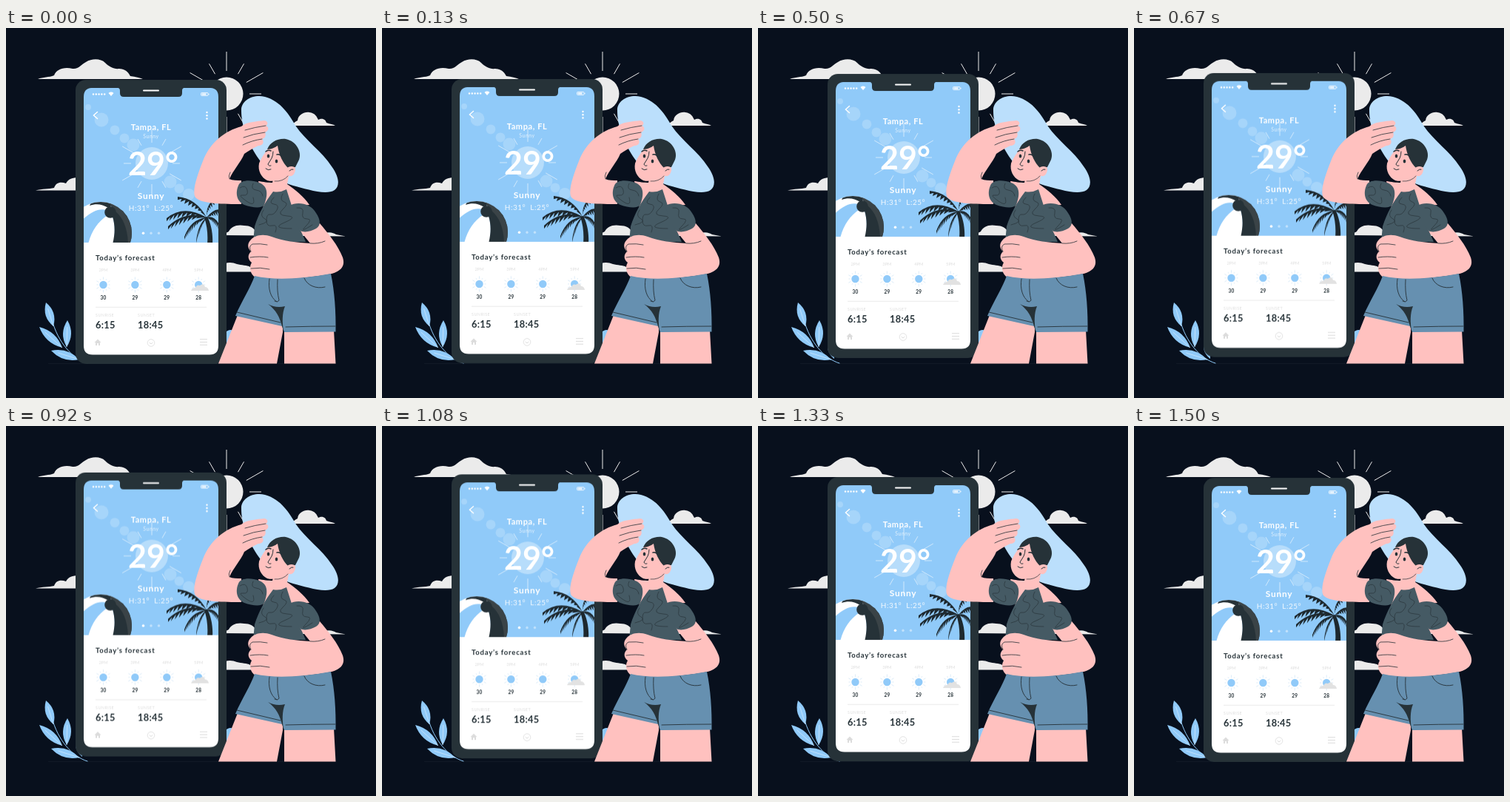
An HTML page that plays this animation: 500 by 500 pixels, repeating every 1540 ms.

```html
<!DOCTYPE html>
<html lang="en">
<head>
<meta charset="utf-8">
<title>Weather app</title>
<style>
  html, body { margin: 0; height: 100%; overflow: hidden; background: #08101d; }
  svg { display: block; width: 100vw; height: 100vh; }
  text { font-family: Lato, "Open Sans", sans-serif; }
  .ln { fill: none; stroke: #263238; stroke-linecap: round; stroke-linejoin: round; }
  .bold { font-weight: 700; }
  .mid { text-anchor: middle; }
  .ink { fill: #263238; }
  .skin { fill: #ffc1bf; }
  .top { fill: #455a64; }
  .blue { fill: #90caf9; }
</style>
</head>
<body>
<svg viewBox="0 0 500 500" xmlns="http://www.w3.org/2000/svg">
  <defs>
    <clipPath id="screen"><path d="M117 81H151Q154 81 154 85V88Q154 93 159 93H233Q238 93 238 88V85Q238 81 241 81H275Q287 81 287 93V429.500Q287 441.500 275 441.500H117Q105 441.500 105 429.500V93Q105 81 117 81Z"/></clipPath>
    <clipPath id="ball"><circle cx="128" cy="277" r="42"/></clipPath>
    <clipPath id="sky"><rect x="105" y="81" width="182" height="209"/></clipPath>
  </defs>

  <path d="M57 453.500H446" stroke="#141e29" stroke-width=".8"/>

  <g id="sun" stroke="#ebebeb" fill="#ebebeb"><circle cx="298" cy="89" r="22.500" stroke="none"/></g>

  <g fill="#ebebeb">
    <path d="M43 69C50 66 58 67 65 64C68 56 78 52 90 55C98 56 102 49 108 46C116 41 128 41 134 47C139 52 146 56 153 55C164 56 166 62 168 65C175 66 181 67 185 69Z"/>
    <path d="M40 219.500C49 217 58 218 65 216C67 209 74 207 81 210C84 204 90 202 98 202V219.500Z"/>
    <path d="M385 132C388 129 390 127 394 125C395 117 403 113 410 114C418 115 420 120 422 124C428 121 432 124 433 128C438 130 442 130 445 132Z"/>
    <path d="M290 280C295 278 298 277 301 275C304 268 313 265 322 267C330 267 334 270 337 274L430 277C438 275 443 277 446 279L459 281.500Z"/>
    <path d="M290 329.500V322C296 316 305 316 312 319C318 321 326 320 330 323L341 329.500Z"/>
  </g>

  <g id="plant">
    <path d="M110 453C90 447 70 425 62 394M82 428Q84 417 83 407M72 427Q60 418 52 409M99 448Q78 445 66 437" class="ln" style="stroke:#90caf9"/>
  </g>
  <path class="blue" d="M96 424C92 430 94 440 103 447V424ZM296 412C300 407 307 407 308 411C309 417 303 424 295 428Z"/>

  <g id="phone">
    <rect x="94" y="70" width="204" height="384" rx="14" fill="#263238"/>
    <path d="M186 84.500H206" stroke="#fff" stroke-width="2" stroke-linecap="round"/>
    <g clip-path="url(#screen)">
      <rect class="blue" x="105" y="81" width="182" height="210"/>
      <g id="flare" fill="#fff" fill-opacity=".2"></g>
      <g id="glow" stroke="#fff" stroke-opacity=".75"><circle cx="197" cy="183" r="22" fill="#fff" fill-opacity=".35" stroke="none"/></g>
      <g clip-path="url(#sky)">
        <g clip-path="url(#ball)">
          <path d="M136 246C124 243 114 249 100 262V230H150L141 244Z" fill="#fff"/>
          <path class="ink" d="M138 243C130 238 122 237 113 240L118 230L142 232C143 236 142 240 141 243Z"/>
          <path d="M137 253C124 262 115 275 111 292H145C148 277 147 264 144 255Z" fill="#fff"/>
          <path class="ink" d="M144 255C148 268 147 280 144 292H176V245L147 247Z"/>
          <path d="M148 248C158 256 164 270 165 290H175V240L141 230V240Z" fill="#3a4347"/>
        </g>
        <circle class="ink" cx="141" cy="249" r="7.800"/>
        <path d="M268 256C272 268 273 280 272 292H279C280 278 277 264 272 255Z" fill="#1d282e"/>
        <g id="palm" fill="#1d282e"></g>
      </g>

      <g fill="#fff">
        <g id="dots"></g>
        <path d="M138.500 88A5 5 0 0 1 145.500 88L142 92Z"/>
        <rect x="263.500" y="87.500" width="9.500" height="4" rx="1" fill="none" stroke="#fff" stroke-width=".8"/>
        <path d="M264.500 88.500H270.500V90.500H264.500ZM273.500 88.700H274.500V90.300H273.500Z"/>
        <path d="M123.500 113.500L118.500 118L123.500 122.500" fill="none" stroke="#fff" stroke-width="1.500" stroke-linecap="round"/>
        <g class="mid">
          <text class="bold" x="196" y="138.500" font-size="11" letter-spacing=".6">Tampa, FL</text>
          <text x="196" y="148.800" font-size="7" letter-spacing=".5" fill-opacity=".75">Sunny</text>
          <text class="bold" x="196" y="230.700" font-size="12" letter-spacing=".7">Sunny</text>
          <text x="196" y="247.500" font-size="10" letter-spacing=".5" fill-opacity=".9" xml:space="preserve">H:31°  L:25°</text>
        </g>
        <text class="bold" x="165" y="199.500" font-size="43">29°</text>
        <circle cx="185.500" cy="277.300" r="1.800"/>
        <g fill-opacity=".45"><circle cx="196" cy="277.300" r="1.700"/><circle cx="206.500" cy="277.300" r="1.700"/></g>
      </g>

      <rect x="105" y="290" width="182" height="152" fill="#fff"/>
      <text class="bold ink" x="121" y="314.300" font-size="9.600" letter-spacing=".75">Today’s forecast</text>
      <g id="hours"></g>
      <path d="M121 377.300H271" stroke="#e6e6e6" stroke-width=".8"/>
      <g font-size="5.500" letter-spacing=".4" fill="#dedede">
        <text x="121" y="389.800">SUNRISE</text>
        <text x="178" y="389.800">SUNSET</text>
      </g>
      <g class="bold ink" font-size="12.800" letter-spacing=".3">
        <text x="121" y="406">6:15</text>
        <text x="178" y="406">18:45</text>
      </g>
      <path d="M119.500 425L124 420.500L128.500 425H127V429H125V426H123V429H121V425Z" fill="#dcdcdc"/>
      <g fill="none" stroke="#dcdcdc">
        <circle cx="196" cy="425.500" r="4.800" stroke-width=".8"/>
        <path d="M193.800 425L196 427L198.200 425M262 420.700H272M262 424.500H272M262 428.300H272"/>
      </g>
    </g>
  </g>

  <g id="woman">
    <path d="M318 112C317 98 334 89 350 93C372 99 383 118 392 133C404 151 428 168 440 187C451 202 451 214 444 219C432 227 405 217 388 213C350 202 318 150 318 112Z" fill="#bbdffc"/>
    <!-- legs -->
    <path class="skin" d="M313 388L287 453.500H366L374 411V398ZM376 408V453.500H445.500L443 408Z"/>
    <!-- neck and shoulders -->
    <path class="skin" d="M362 200L360 209C355 209 347 208 341 207L348 240L337 280H402L400 240L410 239C403 228 390 218 380 211L384 190Z"/>
    <!-- raised arm -->
    <path class="skin" d="M318 133C324 127 340 126 349 125C355 126 354 131 351 132C357 134 354 140 350 141C352 145 350 149 346 150C350 155 346 159 341 159C334 162 328 166 322 170C317 182 307 192 302 204C306 206 312 206 318 206V238C296 238 264 238 256 229C251 221 258 200 266 180C276 154 296 139 318 133Z"/>
    <path class="ln" stroke-width=".8" d="M351 132Q336 134 323 138M350 141Q334 143 321 148M346 150Q332 152 320 158M302 204Q300 200 303 195"/>
    <!-- head -->
    <path class="skin" d="M360 155C353 164 345 175 342 183C340 193 345 202 353 206C360 208 367 206 371 204L381 200C389 200 392 194 390 187L385 160Z"/>
    <path class="ink" d="M353 164C357 154 367 149 378 150C393 153 400 168 396 178L391 188L381 189C374 182 369 172 367 159C364 161 359 164 353 164Z"/>
    <path class="skin" d="M379 190C382 186 390 186 391 190C391 197 386 203 381 199Z"/>
    <path class="ln" stroke-width="1" d="M383 193Q386 190 388 191M361 167Q361 172 359 176L354 184Q355 187 358 186M351 190Q354 193 358 191"/>
    <path class="ln" stroke-width="1.500" d="M351 167Q354 164 358 166M366 171Q370 170 373 174"/>
    <g class="ink"><ellipse cx="354.500" cy="173" rx="1.800" ry="2.500"/><ellipse cx="365.500" cy="180" rx="1.800" ry="2.500"/></g>
    <path class="ln" stroke-width=".7" d="M363 207Q374 208 381 200"/>
    <!-- top -->
    <path class="top" d="M361 221Q370 223 379 218L386 240C391 251 395 261 398 273L405 289H334L336 268C341 252 350 235 361 221Z"/>
    <path class="top" d="M314 213C317 205 331 205 342 209C353 213 355 223 349 239C346 244 333 243 322 239C311 234 310 222 314 213Z"/>
    <!-- folded arm -->
    <path class="skin" d="M397 272C402 280 407 286 411 291C394 290 374 288 359 282C346 277 335 281 331 286C325 292 327 298 331 302C325 308 328 314 332 317C328 323 330 333 337 337C362 343 402 338 430 334C453 331 459 322 455 310C449 294 435 277 424 264Z"/>
    <path class="top" d="M383 240C394 234 412 237 419 250C425 259 426 267 419 271C412 275 403 277 398 274C390 262 386 254 383 240Z"/>
    <path class="ln" style="stroke:#2c393f" stroke-width=".8" d="M362 229q-8 8 0 9t4 8-9 6-5 8 8 7 4 9M374 224q-5 9 2 11t-2 10 6 9-4 9 10 8M348 246q-6 8 2 12t-8 8M316 216q8-5 10 3t-6 7 5 8 9-5M334 210q-4 8 4 9t9 8M393 243q10-1 8 7t6 8-2 10 9-2"/>
    <path class="ln" stroke-width=".8" d="M331 302Q327 295 333 292Q344 291 353 293M330 310Q343 308 354 310M331 325Q344 323 356 326M411 291Q422 292 431 288"/>
    <!-- shorts -->
    <path d="M336 335C331 350 318 370 310 389L373 403L376 411L445.500 410.500C446 385 444 355 439 332C405 338 365 342 336 335Z" fill="#6690b0"/>
    <path class="ink" d="M354 373C361 377 369 378 377 376C373 386 373 398 375.500 411L373 403C370 391 365 381 354 373Z"/>
    <path class="ln" stroke-width=".9" d="M312 384L371 398M378 404Q412 403 445 403M356 339C354 352 357 364 366 370M367 340Q366 356 369 368Q367 371 363 369M403 338C407 348 419 353 431 350"/>
  </g>
</svg>

<script>
  const $ = id => document.getElementById(id);
  const add = (id, html) => $(id).insertAdjacentHTML('beforeend', html);
  const disc = (x, y, r) => `<circle cx="${x}" cy="${y}" r="${r}"/>`;

  function rays(x, y, r, long, short, n, w) {
    let d = '';
    for (let i = 0; i < n; i++) {
      const a = i * 2 * Math.PI / n, end = i % 2 ? long : short;
      const at = k => `${(x + k * Math.cos(a)).toFixed(1)} ${(y + k * Math.sin(a)).toFixed(1)}`;
      d += `M${at(r)}L${at(end)}`;
    }
    return `<path d="${d}" fill="none" stroke-width="${w}"/>`;
  }
  add('sun', rays(298, 89, 31, 57, 47, 12, 1));
  add('glow', rays(197, 183, 28, 46, 38, 12, .8));

  [[111, 107, 4], [129, 124, 9.5], [147, 138, 6.5], [160, 149, 6.5], [172, 158, 8.5],
   [222, 208, 8.5], [234, 217, 6.5], [247, 225, 8]].forEach(f => add('flare', disc(...f)));

  for (let i = 0; i < 5; i++) add('dots', disc(118 + i * 3.8, 89.5, 1.2));
  for (let i = 0; i < 3; i++) add('dots', disc(271.5, 114 + i * 4.3, 1.2));

  // A smooth arched spine with pointed leaflets hanging below it
  function frond(cx, cy, tx, ty) {
    const x0 = 271, y0 = 256, n = 9;
    const at = t => [x0, y0].map((p, i) =>
      (1 - t) ** 2 * p + 2 * t * (1 - t) * [cx, cy][i] + t * t * [tx, ty][i]);
    let d = `M${x0} ${y0}Q${cx} ${cy} ${tx} ${ty}`;
    for (let i = n - 1; i > 0; i--) {
      const [x, y] = at(i / n), [px, py] = at(Math.min(1, (i + 1.3) / n));
      const len = 2 + 7 * Math.sin(Math.PI * i / n);
      d += `L${px} ${py + len}L${x} ${y + 2}`;
    }
    return `<path d="${d}Z"/>`;
  }
  [[257, 230, 232, 228], [240, 238, 217, 257], [243, 246, 219, 268], [250, 258, 241, 282],
   [260, 264, 257, 287], [270, 234, 288, 229], [284, 240, 296, 248], [284, 252, 292, 274]]
    .forEach(f => add('palm', frond(...f)));

  // Leaves: base, tip, half width
  [[64, 403, 54, 371, 11], [76, 432, 45, 404, 11], [82, 431, 83, 395, 11], [99, 448, 61, 436, 11]].forEach(([x, y, tx, ty, w]) => {
    const l = Math.hypot(tx - x, ty - y), px = (y - ty) / l * w, py = (tx - x) / l * w;
    const mx = (x + tx) / 2, my = (y + ty) / 2;
    add('plant', `<path class="blue" d="M${x} ${y}Q${mx + px} ${my + py} ${tx} ${ty}Q${mx - px} ${my - py} ${x} ${y}Z"/>
      <path d="M${x} ${y}L${(mx + tx) / 2} ${(my + ty) / 2}" stroke="#d3eafd" stroke-width=".7"/>`);
  });

  ['30', '29', '29', '28'].forEach((deg, i) => {
    const x = 131.5 + i * 42.9;
    add('hours', `<g class="mid">
      <text x="${x}" y="329.500" font-size="5.800" fill="#dedede">${i + 2}PM</text>
      <g stroke="#cfe4f5">${rays(x, 347, 7, 10.5, 9, 12, .7)}</g>
      <g class="blue">${disc(x, 347, 5.2)}</g>
      ${i === 3 ? '<path d="M250 355Q252 351 256 351Q258 346 262 348Q267 344 269 350Q273 350 274 355Z" fill="#e2e2e2"/>' : ''}
      <text class="bold ink" x="${x}" y="367.300" font-size="6.500" letter-spacing=".2">${deg}</text></g>`);
  });

  const ease = 'cubic-bezier(.37, 0, .63, 1)';
  $('phone').animate([
    { transform: 'translateY(0)', easing: ease },
    { transform: 'translateY(-9.3px)', offset: .455, easing: ease },
    { transform: 'translateY(0)' }
  ], { duration: 1540, delay: -1540 - 30, iterations: Infinity });
</script>
</body>
</html>
```
